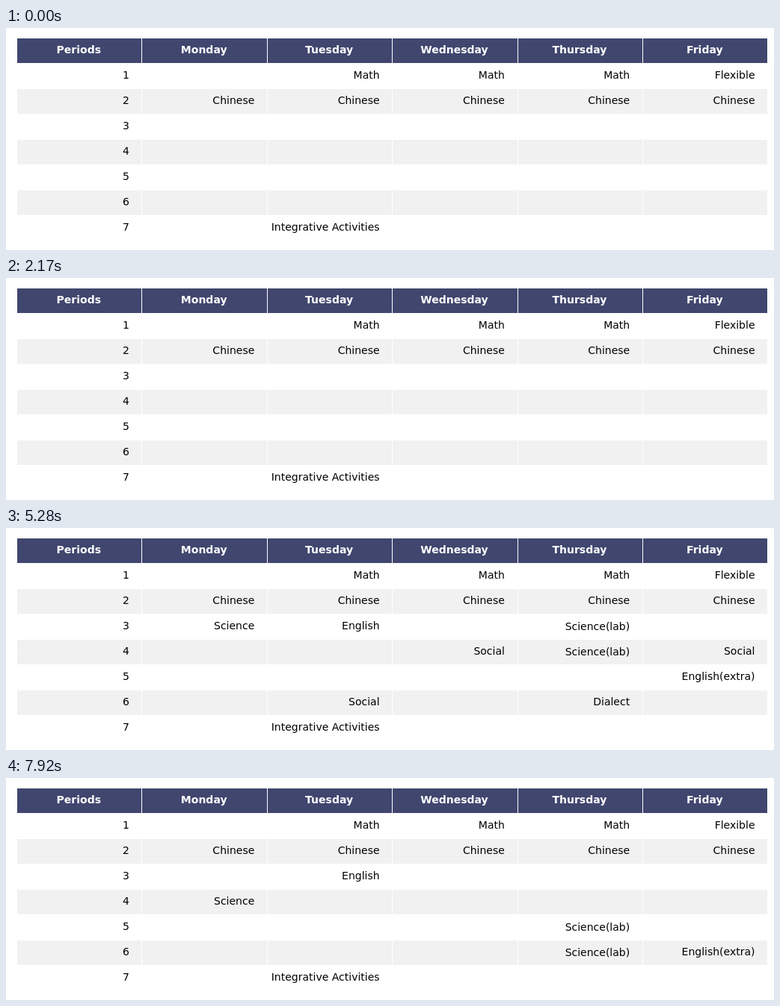
An HTML page that plays this animation: 1027x298 px, repeating every 8 s.

```html
<!DOCTYPE html>
<html lang="en">
<head>
<meta charset="utf-8">
<title>Timetable</title>
<style>
  html, body { margin: 0; width: 100%; height: 100%; overflow: hidden; background: #fff; }
  svg { display: block; }
  text { font: 14px "DejaVu Sans", sans-serif; fill: #000; text-anchor: end; }
  .head { font-weight: bold; fill: #fff; text-anchor: middle; }
</style>
</head>
<body>
<svg id="stage" width="1027" height="298" viewBox="0 0 1027 298"></svg>
<script>
const NS = "http://www.w3.org/2000/svg";
const stage = document.getElementById("stage");
const LOOP = 8000;
const DAYS = ["Periods", "Monday", "Tuesday", "Wednesday", "Thursday", "Friday"];
const EDGES = [14, 181, 349, 516, 684, 851, 1018];

// Entries are "day period subject"
const BASE = [
  "2 1 Math", "3 1 Math", "4 1 Math", "5 1 Flexible",
  "1 2 Chinese", "2 2 Chinese", "3 2 Chinese", "4 2 Chinese", "5 2 Chinese",
  "2 7 Integrative Activities"
];

// Each attempt starts from the base table and adds subjects step by step
const ATTEMPTS = [
  { start: 0, steps: [
    [460, "1 3 Science(lab)", "1 4 Science(lab)", "4 4 Science"],
    [850, "2 5 English", "5 4 English(extra)"],
    [1240, "2 6 Social", "3 4 Social", "4 7 Social", "4 6 Dialect"],
    [1630, "2 3 Art", "2 4 Art", "5 6 PE"]
  ] },
  { start: 2170, steps: [
    [2630, "3 3 Science(lab)", "3 4 Science(lab)", "4 7 Science"],
    [3020, "5 3 English", "1 4 English(extra)"],
    [3410, "1 3 Social", "4 4 Social", "5 6 Social", "2 4 Dialect"]
  ] },
  { start: 3870, steps: [
    [4340, "1 3 Science", "4 3 Science(lab)", "4 4 Science(lab)"],
    [4810, "2 3 English", "5 5 English(extra)"],
    [5280, "2 6 Social", "3 4 Social", "5 4 Social", "4 6 Dialect"],
    [5750, "1 5 Music(extra)", "5 3 Art", "5 6 Art", "2 4 PE"],
    [6130, "1 1 Math", "1 4 Chinese", "4 7 Flexible", "5 7 Integrative Activities"]
  ] },
  { start: 6600, steps: [
    [7530, "1 4 Science", "4 5 Science(lab)", "4 6 Science(lab)"],
    [7920, "2 3 English", "5 6 English(extra)"]
  ] }
];

function add(parent, tag, attrs, label) {
  const el = document.createElementNS(NS, tag);
  for (const key in attrs) el.setAttribute(key, attrs[key]);
  if (label !== undefined) el.textContent = label;
  parent.appendChild(el);
  return el;
}

function cell(parent, col, row, label) {
  // The lab label sits one pixel lower because of its brackets
  const drop = label === "Science(lab)" ? 1 : 0;
  add(parent, "text", { x: 165 + 167.3 * col, y: 34 + 34 * row + drop }, label);
}

function fillCells(parent, entries) {
  for (const entry of entries) {
    const [, col, row, label] = entry.match(/^(\d) (\d) (.+)$/);
    cell(parent, +col, +row, label);
  }
}

function drawBand(row, color) {
  DAYS.forEach((_, i) => add(stage, "rect", {
    x: EDGES[i] + 1, y: 14 + 34 * row,
    width: EDGES[i + 1] - EDGES[i] - 1, height: 33, fill: color
  }));
}

add(stage, "rect", { width: 1027, height: 298, fill: "#fff" });
drawBand(0, "#40466e");
[2, 4, 6].forEach(row => drawBand(row, "#f1f1f2"));
DAYS.forEach((day, i) => add(stage, "text", { class: "head", x: 97.3 + 167.4 * i, y: 34 }, day));
for (let row = 1; row <= 7; row++) cell(stage, 0, row, String(row));
fillCells(stage, BASE);

const layers = [];
ATTEMPTS.forEach(({ steps }, i) => {
  const end = i + 1 < ATTEMPTS.length ? ATTEMPTS[i + 1].start : LOOP;
  for (const [from, ...entries] of steps) {
    const group = add(stage, "g", {});
    fillCells(group, entries);
    layers.push({ group, from, end });
  }
});

function render(t) {
  for (const { group, from, end } of layers) {
    group.setAttribute("visibility", t >= from && t < end ? "visible" : "hidden");
  }
}

const began = performance.now();
function tick() {
  render((performance.now() - began) % LOOP);
  requestAnimationFrame(tick);
}
render(0);
requestAnimationFrame(tick);
</script>
</body>
</html>
```
